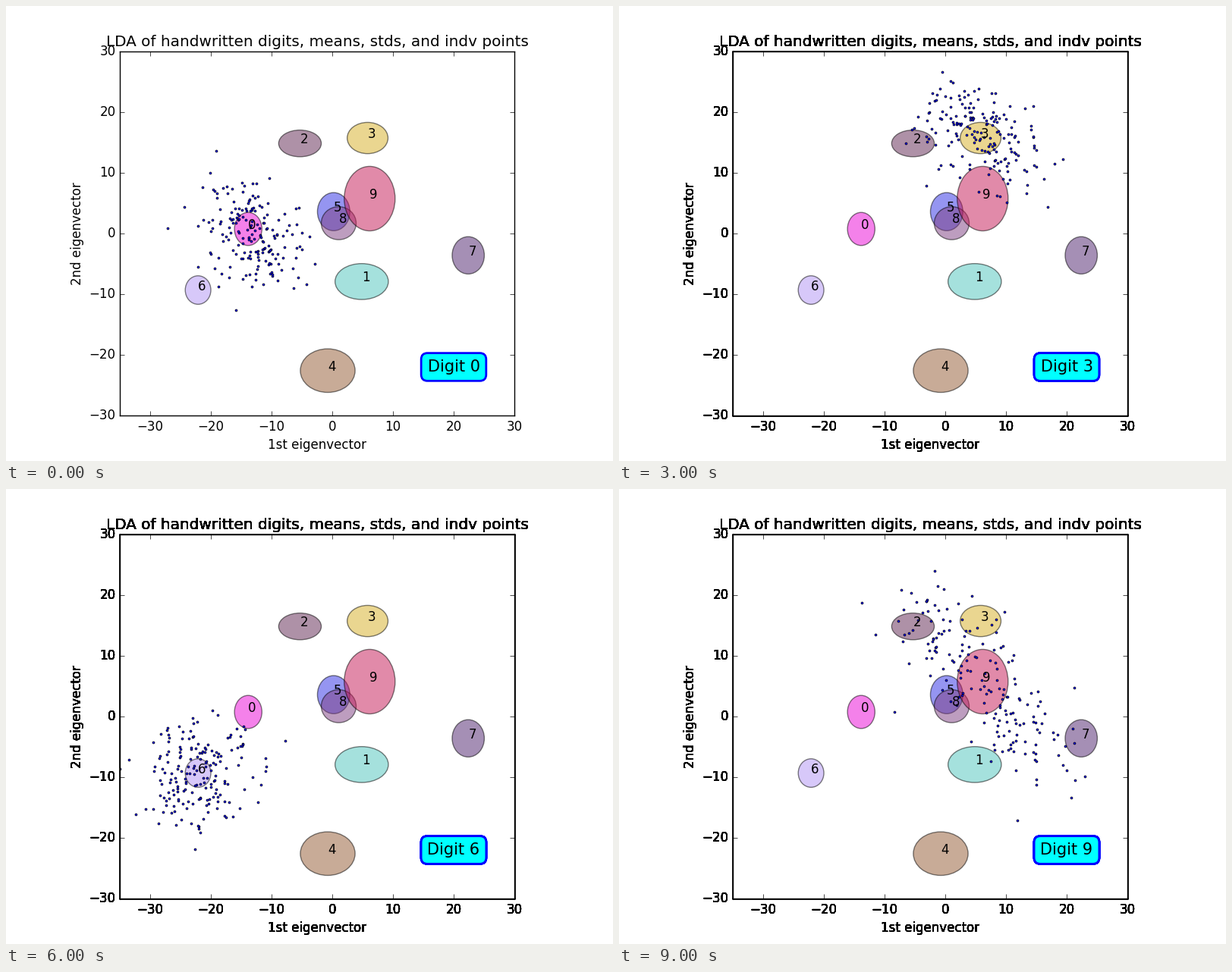
These frames come from a looping animation (800 px wide and 600 px high, 10000 ms). A matplotlib script:

```python
import numpy as np
import matplotlib.pyplot as plt
from matplotlib.animation import FuncAnimation
from matplotlib.patches import Ellipse

plt.style.use("classic")
fig = plt.figure(figsize=(8, 6), dpi=100, facecolor="white")
RECT = [150 / 800, 60 / 600, 520 / 800, 480 / 600]
REDRAWS = 9
POINTS = 180

# Per digit: mean, ellipse size, fill, long axis of its cloud, spread around it
DIGITS = [
    ((-13.85, 0.75), (4.52, 5.45), "#eb05d7", (4, -5), 3.7),
    ((4.85, -7.92), (8.78, 5.92), "#4dc5bd", (10, -3), 4.3),
    ((-5.32, 14.85), (7.02, 4.40), "#5f2551", (9, -3), 4.0),
    ((5.82, 15.74), (6.72, 5.15), "#d7af23", (8, -5), 3.8),
    ((-0.75, -22.60), (9.02, 7.18), "#935931", (5, 0), 4.3),
    ((0.23, 3.60), (5.34, 6.28), "#2d2de5", (2, -4), 4.8),
    ((-22.11, -9.32), (4.22, 4.70), "#b193f5", (0, 0), 4.6),
    ((22.40, -3.60), (5.30, 6.15), "#4d216d", (4, -3), 5.0),
    ((1.06, 1.70), (5.75, 5.44), "#7d3d81", (0, 0), 4.9),
    ((6.16, 5.75), (8.38, 10.63), "#c51755", (11, -13), 3.7),
]


def decorate(ax):
    ax.set_xlim(-35, 30)
    ax.set_ylim(-30, 30)
    ax.set_xticks(range(-30, 31, 10))
    ax.set_yticks(range(-30, 31, 10))
    ax.set_title("LDA of handwritten digits, means, stds, and indv points")
    ax.set_xlabel("1st eigenvector")
    ax.set_ylabel("2nd eigenvector")


def cloud(seed, mean, axis, spread):
    """Points scattered along an axis through the mean."""
    rng = np.random.default_rng(seed)
    along = rng.uniform(-1, 1, (POINTS, 1)) * axis
    return mean + along + rng.normal(0, spread, (POINTS, 2))


# Repeated copies below the plot thicken the text and the outer frame
under = [fig.add_axes(RECT, zorder=0) for _ in range(REDRAWS)]
ax = fig.add_axes(RECT, zorder=1)
for a in under + [ax]:
    decorate(a)

clouds, tags = [], []
box = dict(boxstyle="round,pad=0.4", facecolor="cyan", edgecolor="blue",
           linewidth=2)
for d, (mean, size, color, axis, spread) in enumerate(DIGITS):
    ax.add_patch(Ellipse(mean, *size, facecolor=color, edgecolor="black",
                         linewidth=1, alpha=0.5, zorder=1))
    ax.text(*mean, str(d), fontsize=12, zorder=3)
    clouds.append(cloud(d, mean, axis, spread))
    tags.append(ax.text(20, -22, f"Digit {d}", fontsize=15, ha="center",
                        va="center", zorder=4, bbox=box))

dots = ax.scatter([], [], s=4.5, c="blue", edgecolors="black",
                  linewidths=0.5, zorder=2)


def update(i):
    dots.set_offsets(clouds[i])
    # Each new tag is laid over the earlier ones
    for d, tag in enumerate(tags):
        tag.set_visible(d <= i)
    for a in under:
        a.set_visible(i > 0)
    return [dots, *tags]


anim = FuncAnimation(fig, update, frames=len(DIGITS), interval=1000,
                     init_func=lambda: update(0), repeat=True, repeat_delay=0)
plt.show()
```
